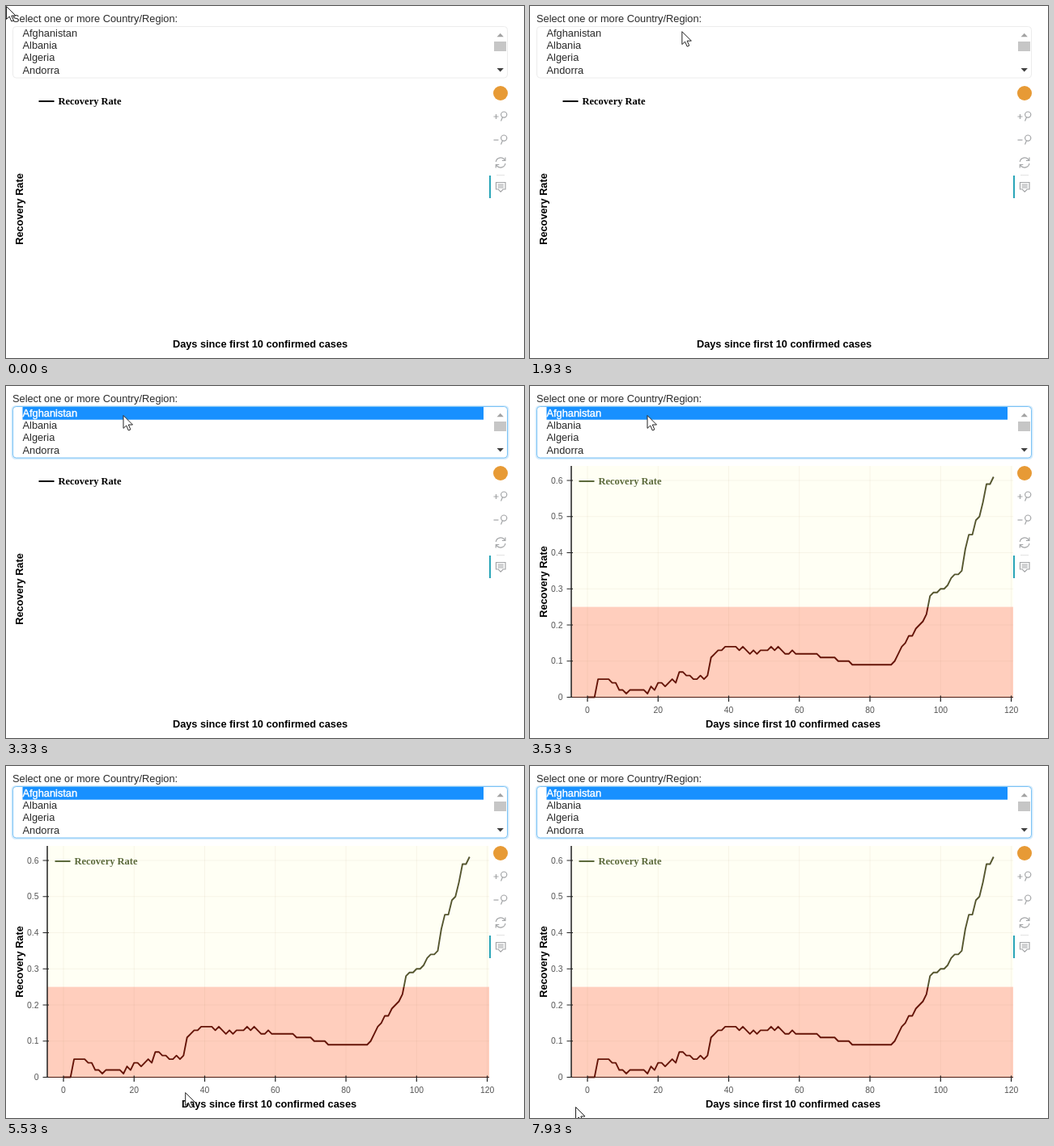
Write an HTML page that moves like this. It is 640 px wide and 436 px high and loops after 8 s.

```html
<!DOCTYPE html>
<html lang="en">
<head>
<meta charset="utf-8">
<title>Recovery Rate</title>
<style>
  html, body { margin: 0; width: 100%; height: 100%; overflow: hidden; background: #fff; }
  svg { display: block; width: 640px; height: 436px; }
  text { font: 12.8px "Liberation Sans", Arial, sans-serif; fill: #2a2a2a; }
  .title { font-weight: bold; font-size: 12.75px; fill: #000; text-anchor: middle; }
  .legend { font: bold 12.5px "Liberation Serif", Times, serif; }
  .tick { font-size: 10.4px; fill: #555; }
  .icon { fill: none; stroke: #a3a5a7; stroke-width: 1.2; }
</style>
</head>
<body>
<svg viewBox="0 0 640 436">
  <defs>
    <linearGradient id="ink" gradientUnits="userSpaceOnUse" x1="0" y1="99" x2="0" y2="386">
      <stop offset=".609" stop-color="#55562f"/>
      <stop offset=".609" stop-color="#651407"/>
    </linearGradient>
  </defs>

  <text x="8" y="20.4">Select one or more Country/Region:</text>
  <rect id="glow" x="8" y="25.5" width="612" height="64" rx="4" fill="none" stroke="#d4ebfc" stroke-width="3"/>
  <rect id="box" x="8.5" y="25.5" width="611" height="63.5" rx="4" fill="#fff"/>
  <rect id="pick" x="20.5" y="26" width="569.5" height="15.7" fill="#1890ff"/>
  <g id="options"></g>
  <path d="M606.5 38.2h8.4l-4.2-4.4z" fill="#a3a3a3"/>
  <rect x="603" y="44" width="15" height="12" fill="#c6c6c6"/>
  <path d="M606.5 77h8.4l-4.2 4.4z" fill="#404040"/>

  <g id="chart">
    <rect x="51" y="99" width="546" height="175" fill="#fffff4"/>
    <rect x="51" y="273.6" width="546" height="112" fill="#ffcebd"/>
    <path id="grid" stroke="#a08060" stroke-opacity=".09" fill="none"/>
    <path id="curve" fill="none" stroke="url(#ink)" stroke-width="1.9" stroke-linejoin="round"/>
    <path d="M51 99V386" stroke="#111" stroke-width="1.4"/>
    <path d="M50.5 385.5H597" stroke="#4a1a10" stroke-width="1.2"/>
    <path id="ticks" stroke="#222" stroke-width="1.2"/>
    <g id="labels"></g>
  </g>

  <g id="legend">
    <path d="M40.5 118H59.5" stroke-width="2"/>
    <text class="legend" x="64.5" y="121.5" style="fill:inherit">Recovery Rate</text>
  </g>
  <text id="yTitle" class="title">Recovery Rate</text>
  <text id="xTitle" class="title" y="422.5">Days since first 10 confirmed cases</text>

  <circle cx="611" cy="108" r="9" fill="#e79a35"/>
  <g class="icon">
    <path d="M602.5 137h6M605.5 134v6"/>
    <path d="M602.5 166h6"/>
    <path id="lens" d="M611.5 142.5l1.9-4.4"/>
    <circle cx="615.2" cy="134.6" r="3.6"/>
    <path d="M611.5 171.5l1.9-4.4"/>
    <circle cx="615.2" cy="163.6" r="3.6"/>
    <path d="M605.3 193a5.9 5.9 0 0 1 10.8-2.4M616.9 195a5.9 5.9 0 0 1-10.8 2.4M616.9 187.5v4h-4M605.3 200.5v-4h4"/>
    <path d="M606 209.5h10" stroke="#e4e4e4"/>
    <path d="M605.5 218.5h11.5v8.5h-2.8l-3 3.2-3-3.2h-2.7zM607.6 221h7.2M607.6 223h7.2M607.6 225h7.2"/>
  </g>
  <rect x="597" y="210" width="2" height="28" fill="#2ba6b8"/>

  <path id="cursor" d="M.5 .5V16.4L4.2 13 6.8 19 9.4 17.9 6.8 12H12z" fill="#fff" stroke="#222" stroke-linejoin="round"/>
</svg>
<script>
const LOOP = 8000, FPS = 15;
const $ = id => document.getElementById(id);
const px = day => 71 + day * 4.363;
const py = rate => 385.5 - rate * 447.5;

function addText(parent, x, y, content, attrs = {}) {
  const el = document.createElementNS("http://www.w3.org/2000/svg", "text");
  for (const [k, v] of Object.entries({ x, y, ...attrs })) el.setAttribute(k, v);
  el.textContent = content;
  parent.append(el);
  return el;
}

const options = ["Afghanistan", "Albania", "Algeria", "Andorra"]
  .map((name, i) => addText($("options"), 20.5, 37.8 + i * 15.3, name));

// Recovery rate per day, in percent
const run = (value, days) => Array(days).fill(value);
const rates = [
  ...run(0, 3), ...run(5, 4), 4, 4, 2, 2, 1, ...run(2, 5), 1, 3, 2,
  4, 4, 3, 4, 5, 4, 7, 7, 6, 6, 5, 5, 6, 5, 6, 11, 12, 13, 13,
  ...run(14, 4), 13, 14, 13, 12, 13, 12, ...run(13, 3), 14, 13, 14, 13,
  12, 12, 13, ...run(12, 7), ...run(11, 5), ...run(10, 4), ...run(9, 12),
  10, 12, 14, 15, 17, 17, 19, 20, 21, 23, 28, 29, 29, 30, 30, 31, 33,
  34, 34, 35, 41, 45, 45, 49, 50, 54, 59, 59, 61
];
$("curve").setAttribute("d", "M" + rates.map((r, day) => `${px(day)} ${py(r / 100)}`).join("L"));

let grid = "", ticks = "";
for (let i = 0; i <= 6; i++) {
  const x = px(i * 20), y = py(i / 10);
  grid += `M${x} 99V385M51 ${y}H597`;
  ticks += `M${x} 383.5V391M45.5 ${y}H53`;
  addText($("labels"), x, 404.6, i * 20, { class: "tick", "text-anchor": "middle" });
  addText($("labels"), 40.5, y + 3.7, i ? "0." + i : "0", { class: "tick", "text-anchor": "end" });
}
$("grid").setAttribute("d", grid);
$("ticks").setAttribute("d", ticks);

// Pointer stops: time, x, y
const path = [
  [260, 451, 1], [530, 318, 24], [770, 212, 41], [930, 187.5, 31],
  [1930, 187.5, 31], [2270, 172, 50], [2670, 144.5, 36],
  [4800, 144.5, 36], [5130, 208, 378], [5260, 213, 390], [5530, 221, 404],
  [6070, 252, 416], [6930, 290, 423], [7060, 290, 423],
  [7530, 230, 421], [7865, 102, 421], [7930, 56, 422]
];

function pointer(t) {
  if (t < 130) return [0, 0];
  if (t < path[0][0]) return null;
  const i = path.findIndex(p => p[0] > t);
  if (i < 0) return path[path.length - 1].slice(1);
  const [t0, x0, y0] = path[i - 1], [t1, x1, y1] = path[i];
  const k = (t - t0) / (t1 - t0);
  return [x0 + (x1 - x0) * k, y0 + (y1 - y0) * k];
}

const show = (id, on) => $(id).setAttribute("visibility", on ? "visible" : "hidden");

function draw(ms) {
  const t = Math.floor((ms % LOOP + 5) * FPS / 1000) * 1000 / FPS;
  const picked = t >= 2995, plotted = t >= 3525;

  show("pick", picked);
  show("glow", picked);
  $("box").setAttribute("stroke", picked ? "#7cc3f5" : "#ececec");
  options[0].style.fill = picked ? "#fff" : "";
  options[0].style.stroke = picked ? "#fff" : "none";
  options[0].style.strokeWidth = .4;

  show("chart", plotted);
  $("legend").setAttribute("transform", `translate(${plotted ? 20 : 0} 0)`);
  $("legend").setAttribute("fill", plotted ? "#5c6a3c" : "#000");
  $("legend").setAttribute("stroke", "none");
  $("legend").firstElementChild.setAttribute("stroke", plotted ? "#5c6a3c" : "#000");
  $("xTitle").setAttribute("x", plotted ? 325 : 314);
  $("yTitle").setAttribute("transform", `translate(20.5 ${plotted ? 242.5 : 251.5}) rotate(-90)`);

  const at = pointer(t);
  show("cursor", at);
  if (at) $("cursor").setAttribute("transform", `translate(${at})`);
}

const start = performance.now();
function tick() {
  draw(performance.now() - start);
  requestAnimationFrame(tick);
}
tick();
</script>
</body>
</html>
```
